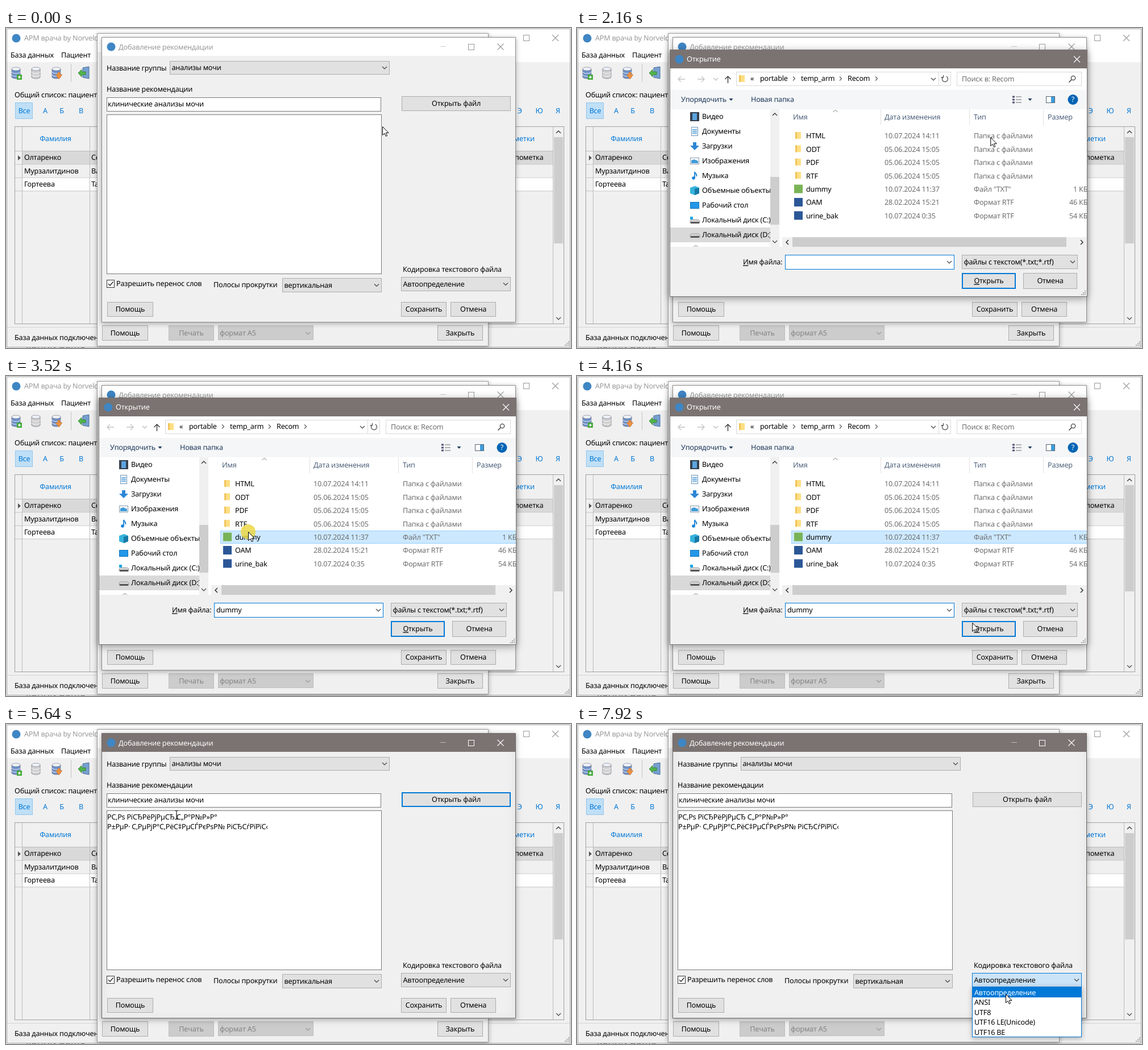
Recreate the animation shown at these times as an HTML page. Size 994 px wide and 563 px high, loop 8 s.

```html
<!DOCTYPE html>
<html lang="ru">
<head>
<meta charset="utf-8">
<title>Добавление рекомендации</title>
<style>
html, body { margin: 0; width: 100%; height: 100%; overflow: hidden; background: #f4f4f4; }
svg { display: block; width: 994px; height: 563px; }
text {
  font: 12.6px "Noto Sans", "Open Sans", sans-serif;
  letter-spacing: -.2px; text-rendering: geometricPrecision; fill: #000;
}
.mid { text-anchor: middle; }
.blue { fill: #0078d7; }
.white { fill: #fff; }
.dim { fill: #999; }
.off { fill: #838383; }
.meta { fill: #6d6d6d; }
.head { fill: #4c607a; }
.navy { fill: #1e395b; }
.ghost { font-size: 18px; fill: #777; }
.shadow { filter: drop-shadow(0 3px 7px rgba(0,0,0,.38)); }
.soft { filter: drop-shadow(0 2px 4px rgba(0,0,0,.3)); }

.step { opacity: 0; animation: 8s step-end infinite; }
#active { animation-name: active; }
#pickHover { animation-name: pickHover; }
#pickFocus { animation-name: pickFocus; }
#memo { animation-name: late; }
#okHover { animation-name: okHover; }
#caret { animation-name: caret; }
#rowHover { animation-name: rowHover; }
#rowOn { animation-name: rowOn; }
#rowGrey, #marked { animation-name: late; }
#typed { animation-name: typed; }
#coding { animation-name: coding; }
#list { animation-name: list; }
#ring { animation-name: ring; }
#beam { animation-name: beam; }
#arrow { animation: arrow 8s step-end infinite; }
#open { opacity: 0; transform-origin: 531px 255px; animation: open 8s linear infinite; }
#cursor { animation: move 8s ease-in-out infinite; }

@keyframes active { 0%, 23.5% { opacity: 0 } 1%, 55%, 100% { opacity: 1 } }
@keyframes pickHover { 0%, 23.5%, 100% { opacity: 0 } 15.2% { opacity: 1 } }
@keyframes pickFocus { 0%, 91%, 100% { opacity: 0 } 23.5% { opacity: 1 } }
@keyframes late { 0% { opacity: 0 } 55%, 100% { opacity: 1 } }
@keyframes okHover { 0%, 33%, 100% { opacity: 0 } 30%, 53% { opacity: 1 } }
@keyframes caret { 0%, 38.5%, 100% { opacity: 0 } 32% { opacity: 1 } }
@keyframes rowHover { 0%, 44%, 100% { opacity: 0 } 39.5% { opacity: 1 } }
@keyframes rowOn { 0%, 55%, 100% { opacity: 0 } 44% { opacity: 1 } }
@keyframes typed { 0% { opacity: 0 } 44%, 100% { opacity: 1 } }
@keyframes coding { 0% { opacity: 0 } 84.5%, 100% { opacity: 1 } }
@keyframes list { 0% { opacity: 0 } 91.5%, 100% { opacity: 1 } }
@keyframes ring { 0%, 23%, 45%, 56%, 92.5%, 100% { opacity: 0 } 21.5%, 44%, 54.5%, 91% { opacity: .8 } }
@keyframes beam { 0%, 78%, 100% { opacity: 0 } 63.5% { opacity: 1 } }
@keyframes arrow { 0%, 78%, 100% { opacity: 1 } 63.5% { opacity: 0 } }
@keyframes open {
  0%, 23.5% { opacity: 0; transform: scale(.92) }
  26%, 55% { opacity: 1; transform: none }
  56.5% { opacity: .42; transform: scale(.974) }
  59%, 100% { opacity: 0; transform: scale(.95) }
}
@keyframes move {
  0%, 1% { transform: translate(662px,173px) }
  3.5%, 9% { transform: translate(664px,181px) }
  19%, 25.5% { transform: translate(732px,133px) }
  30.5%, 32% { transform: translate(707px,443px) }
  42%, 45.2% { transform: translate(426px,274px) }
  53.5%, 61.5% { transform: translate(714px,445px) }
  69.5% { transform: translate(303px,153px) }
  70.5% { transform: translate(300px,160px) }
  71.5%, 72.5% { transform: translate(301px,172px) }
  79.5%, 84% { transform: translate(694px,440px) }
  86.5%, 97.5% { transform: translate(768px,454px) }
  99%, 100% { transform: translate(754px,475px) }
}
</style>
</head>
<body>
<svg id="stage" viewBox="0 0 994 563"></svg>
<script>
const rect = (x, y, w, h, fill, line, lw = 1) => line
  ? `<rect x="${x + lw / 2}" y="${y + lw / 2}" width="${w - lw}" height="${h - lw}" fill="${fill}" stroke="${line}" stroke-width="${lw}"/>`
  : `<rect x="${x}" y="${y}" width="${w}" height="${h}" fill="${fill}"/>`;
const text = (x, y, s, cls = '') => `<text x="${x}" y="${y + 4.4}" class="${cls}">${s}</text>`;
const path = (d, line = '#333', w = 1, fill = 'none') => `<path d="${d}" stroke="${line}" stroke-width="${w}" fill="${fill}"/>`;
const disc = (x, y, r, fill) => `<circle cx="${x}" cy="${y}" r="${r}" fill="${fill}"/>`;
const group = (id, body, cls = 'step') => `<g id="${id}" class="${cls}">${body}</g>`;
const clip = (id, x, y, w, h, body) =>
  `<clipPath id="${id}">${rect(x, y, w, h, '#000')}</clipPath><g clip-path="url(#${id})">${body}</g>`;

const down = (x, y, c = '#444') => path(`M${x - 4} ${y - 2}l4 4 4-4`, c, 1.2);
const up = (x, y) => path(`M${x - 4} ${y + 2}l4-4 4 4`, '#444', 1.5);
const right = (x, y, c = '#555') => path(`M${x - 2} ${y - 3.5}l3.5 3.5-3.5 3.5`, c, 1.1);
const tri = (x, y) => path(`M${x - 3.5} ${y - 2}h7l-3.5 4z`, 'none', 0, '#1e395b');
const cross = (x, y, c) => path(`M${x - 5.5} ${y - 5.5}l11 11m0-11l-11 11`, c, 1.1);
const box = (x, y, c) => rect(x - 5, y - 5, 11, 11, 'none', c);
const button = (x, y, w, h, s, line = '#adadad', fill = '#e1e1e1', lw = 1) =>
  rect(x, y, w, h, fill, line, lw) + text(x + w / 2, y + h / 2, s, 'mid');
const combo = (x, y, w, h, s, line = '#adadad', fill = '#e1e1e1') =>
  rect(x, y, w, h, fill, line) + text(x + 3.5, y + h / 2, s) + down(x + w - 9, y + h / 2);
const grip = (x, y) => [[0, 0], [-3, 0], [-6, 0], [0, -3], [-3, -3], [0, -6]]
  .map(([a, b]) => rect(x + a, y + b, 2, 2, '#a8a8a8')).join('');
const folder = (x, y) => rect(x - 5, y - 6, 10, 12, '#ffdf84') + rect(x - 5, y - 6, 3, 12, '#f1c45c');
const disk = (x, y) => path(`M${x - 8} ${y - 1}l3-2h11l3 2v4h-17z`, '#777', .6, '#d4d4d4') + rect(x - 7, y + 1, 15, 3, '#555');
const drum = (x, c, mark) =>
  path(`M${x - 9} 72v14c0 4 15 4 15 0v-14`, '#778', .8, c) +
  `<ellipse cx="${x - 1.5}" cy="72" rx="7.5" ry="3" fill="#eef3fa" stroke="#889" stroke-width=".8"/>` +
  path(`M${x - 9} 77c0 4 15 4 15 0m-15 5c0 4 15 4 15 0`, '#fff', .9) + mark;

function mainWindow() {
  const rows = [['Олтаренко', 'Се', '#d9d9d9'], ['Мурзалитдинов', 'Ва', '#f0f0f0'], ['Гортеева', 'Та', '#fff']];
  const grid = rows.map(([name, first, fill], i) => {
    const y = 217 + i * 23.4;
    return rect(29, y, 933, 23.4, fill) + path(`M16 ${y + 23}H962`, '#c4c4c4') +
      text(32, y + 11, name) + text(150, y + 11, first);
  }).join('');
  const letters = [['А', 69], ['Б', 98], ['В', 132], ['Э', 904], ['Ю', 938], ['Я', 971]];
  return text(35, 567, 'конци раше', 'ghost') +
    rect(1, 1, 992, 561, '#f0f0f0', '#a0a0a0') + rect(2, 2, 990, 58, '#fff') +
    disc(18, 18, 7.5, '#3f86c4') + text(32, 18, 'АРМ врача by Norvelda', 'dim') +
    box(915, 17, '#999') + cross(966.5, 17.5, '#999') +
    text(8, 48, 'База данных') + text(97, 48, 'Пациент') +
    drum(19, '#6b8fc7', rect(19, 82, 9, 9, '#45a83a') + path('M23.5 84v5m-2.5-2.5h5', '#fff', 1.5)) +
    drum(54, '#cfcfcf', '') +
    drum(90, '#6b8fc7', path('M87 82h4v-4h4v4h4l-6 8z', '#c56d20', .6, '#ee9142')) +
    path('M114.500 63v32', '#c4c4c4') +
    path('M135 70l11-2v21l-11-2z', '#4b6f9b', 1, '#76a0cf') + path('M127 79l6-6v4h7v5h-7v4z', '#277b2a', .8, '#52b54a') +
    text(15, 118, 'Общий список: пациенты') +
    rect(16, 131, 31, 29, '#bfdff6', '#93c5ea') + text(32, 146, 'Все', 'mid blue') +
    letters.map(([s, x]) => text(x, 146, s, 'mid blue')).join('') +
    rect(15, 173, 967, 348, '#f0f0f0', '#a0a0a0') + grid +
    path('M16 216.500H962M28.500 174V520M147.500 174V520M962.500 174V520', '#bcbcbc') +
    path('M21 224l5 4.500-5 4.500z', 'none', 0, '#555') +
    text(87, 195, 'Фамилия', 'mid blue') +
    `<text x="930" y="199.400" class="blue" text-anchor="end">Пометки</text>` +
    text(895, 228, 'пометка') +
    up(972, 183) + rect(964, 192, 16, 187, '#cdcdcd') + down(972, 511) +
    path('M2 526.500H992', '#d4d4d4') + text(15, 545, 'База данных подключена') + grip(989, 557);
}

function backWindow() {
  return `<g class="soft">${rect(160, 9, 689, 551, '#f0f0f0', '#9a9a9a')}</g>` + rect(161, 10, 687, 32, '#fff') +
    button(169, 523, 81, 27, 'Помощь') + rect(286, 523, 80, 27, '#ccc', '#bfbfbf') + text(326, 537, 'Печать', 'mid off') +
    rect(373, 523, 168, 26, '#ccc', '#bfbfbf') + text(376, 537, 'формат А5', 'off') + down(531, 537, '#999') +
    button(759, 523, 80, 27, 'Закрыть');
}

function caption(fill, cls, line) {
  return rect(169, 17, 727, 32, fill) + disc(185, 33, 7.5, '#3f86c4') +
    text(198, 34, 'Добавление рекомендации', cls) +
    path('M764 32.500h10', line, .5) + box(818, 33, line) + cross(870, 33, line);
}

function editor() {
  return `<g class="soft">${rect(168, 16, 729, 502, '#f0f0f0', '#8d8d8d')}</g>` + caption('#fff', 'dim', '#999') +
    group('active', `<g class="shadow">${rect(168, 16, 729, 502, 'none', '#6d6865')}</g>` + caption('#7a7371', 'white', '#fff')) +
    text(177, 71, 'Название группы') + combo(288, 58, 387, 24, 'анализы мочи') +
    text(177, 108, 'Название рекомендации') +
    rect(177, 122, 483, 25, '#fff', '#7a7a7a') + text(179, 134, 'клинические анализы мочи') +
    button(696, 120, 192, 26, 'Открыть файл') +
    group('pickHover', button(696, 120, 192, 26, 'Открыть файл', '#0078d7', '#e5f1fb')) +
    group('pickFocus', button(696, 120, 192, 26, 'Открыть файл', '#0078d7', '#e1e1e1', 2)) +
    rect(177, 152, 484, 281, '#fff', '#7a7a7a') +
    group('memo', text(178, 164, 'РС‚Рѕ РїСЂРёРјРµСЂ С„Р°Р№Р»Р°') +
      text(178, 181, 'Р±РµР· С‚РµРјР°С‚РёС‡РµСЃРєРѕР№ РіСЂСѓРїРїС‹')) +
    rect(177, 443, 14, 14, '#fff', '#333') + path('M180 450l3 3 5.500-6.500', '#222', 1.3) +
    text(194, 450, 'Разрешить перенос слов') + text(365, 452, 'Полосы прокрутки') +
    combo(486, 440, 175, 25, 'вертикальная') +
    text(698, 425, 'Кодировка текстового файла') + combo(695, 438, 193, 25, 'Автоопределение') +
    group('coding', combo(695, 438, 193, 25, 'Автоопределение', '#0078d7', '#cce4f7')) +
    button(178, 482, 81, 26, 'Помощь') + button(695, 482, 80, 26, 'Сохранить') + button(782, 482, 80, 26, 'Отмена');
}

function sideTree() {
  const icons = [
    y => rect(199, y - 8, 16, 16, '#36414d') + rect(203, y - 6, 8, 12, '#5ba4e0'),
    y => rect(201, y - 8, 12, 16, '#f5faff', '#6d96b8') + path(`M203 ${y - 3}h8m-8 3h8m-8 3h8`, '#4c9cd5', 1.3),
    y => path(`M204 ${y - 7}h6v6h5l-8 8-8-8h5z`, 'none', 0, '#2e87d6'),
    y => rect(199, y - 6, 16, 12, '#fff', '#8a9aa8') + path(`M201 ${y + 4}v-5l5-2 7 3v4z`, 'none', 0, '#3f9bd8'),
    y => path(`M207 ${y + 4}v-11c1 4 5 4 3 8`, '#1883d7', 1.8) + disc(205, y + 4, 2.8, '#1883d7'),
    y => path(`M199 ${y - 5}l9-3 7 3v10l-8 3-8-3z`, 'none', 0, '#36b3dc') + path(`M207 ${y - 3}l8-2v10l-8 3z`, 'none', 0, '#1679a6'),
    y => rect(199, y - 6, 16, 12, '#2397e8', '#1273bb'),
    y => disk(207, y + 2) + rect(199, y - 6, 5, 5, '#20a5e5'),
    y => disk(207, y + 1)
  ];
  const names = ['Видео', 'Документы', 'Загрузки', 'Изображения', 'Музыка', 'Объемные объекты',
    'Рабочий стол', 'Локальный диск (C:)', 'Локальный диск (D:)'];
  return rect(164, 351, 176, 26, '#d9d9d9') +
    names.map((s, i) => icons[i](156 + i * 26) + text(220, 156 + i * 26, s)).join('') +
    `<circle cx="209" cy="388" r="5" fill="#eee" stroke="#999"/>`;
}

function fileRows() {
  const files = [
    ['HTML', '10.07.2024 14:11'], ['ODT', '05.06.2024 15:05'], ['PDF', '05.06.2024 15:05'], ['RTF', '05.06.2024 15:05'],
    ['dummy', '10.07.2024 11:37', 'Файл "TXT"', '1 КБ', '#79b356'],
    ['OAM', '28.02.2024 15:21', 'Формат RTF', '46 КБ', '#2b5797'],
    ['urine_bak', '10.07.2024 0:35', 'Формат RTF', '54 КБ', '#2b5797']
  ];
  return files.map(([name, date, type = 'Папка с файлами', size = '', mark], i) => {
    const y = 190 + i * 23.4;
    return (mark ? rect(382, y - 8, 15, 15, mark) : folder(389, y - 1)) +
      text(403, y, name) + text(541, y, date, 'meta') + text(698, y, type, 'meta') +
      text(size.length > 4 ? 866 : 873, y, size, 'meta');
  }).join('');
}

function openDialog() {
  return `<g class="shadow">${rect(163, 38, 735, 435, '#f0f0f0', '#77716f')}</g>` +
    rect(163, 38, 735, 33, '#7a7371') + disc(180, 55, 7.5, '#3f86c4') + text(193, 55, 'Открытие', 'white') + cross(879.5, 55, '#fff') +
    rect(164, 71, 733, 314, '#fff') + rect(164, 109, 733, 34, '#f5f6f7') +
    path('M190 90h-12m5-5l-5 5 5 5M212 90h12m-5-5l5 5-5 5', '#c3c3c3', 1.3) + down(244, 90, '#bbb') +
    path('M265.500 97v-12m-5 5l5-5 5 5', '#444', 1.5) +
    rect(280, 77, 378, 25, '#fff', '#d9d9d9') + path('M636.500 78v23', '#d9d9d9') + folder(290, 89) +
    text(305, 89, '«') + text(322, 89, 'portable') + text(394, 89, 'temp_arm') + text(476, 89, 'Recom') +
    right(382, 89) + right(464, 89) + right(527, 89) + down(627, 90) +
    path('M643.500 86.500a5 5 0 1 0 6-1.500m-5-2v4h-4', '#555', 1.3) +
    rect(668, 77, 220, 25, '#fff', '#d9d9d9') + text(677, 90, 'Поиск в: Recom', 'meta') +
    `<circle cx="873" cy="88" r="3.700" fill="none" stroke="#444" stroke-width="1.300"/>` + path('M870 91l-4.500 4.500', '#444', 1.6) +
    text(183, 126, 'Упорядочить', 'navy') + tri(271, 126) + text(306, 126, 'Новая папка', 'navy') + tri(797, 126) +
    path('M766 121h4m-4 5h4m-4 5h4', '#557', 3) + path('M772 121h10m-10 5h10m-10 5h10', '#999', 1.5) +
    rect(825, 120, 16, 12, '#fff', '#567') + rect(834, 121, 6, 10, '#3e9bd9') +
    disc(872.5, 126, 9, '#0064b5') + text(872.5, 126, '?', 'mid white') +
    clip('treeClip', 164, 143, 176, 242, sideTree()) +
    rect(340, 143, 16, 242, '#f0f0f0') + rect(340, 262, 16, 84, '#cdcdcd') + up(348, 152) + down(348, 376) +
    text(380, 157, 'Имя', 'head') + text(541, 157, 'Дата изменения', 'head') + text(698, 157, 'Тип', 'head') + text(828, 157, 'Размер', 'head') +
    path('M534.500 143v28M690.500 143v28M820.500 143v28', '#e2e2e2') + path('M450.500 148l4-4 4 4', '#777') +
    clip('fileClip', 357, 143, 540, 225,
      group('rowHover', rect(377, 272, 540, 23, '#e5f3ff')) +
      group('rowOn', rect(377, 272, 540, 23, '#cce8ff', '#99d1ff')) +
      group('rowGrey', rect(377, 272, 540, 23, '#d9d9d9')) + fileRows()) +
    rect(361, 368, 536, 17, '#f0f0f0') + rect(379, 368, 482, 17, '#cdcdcd') +
    path('M372 373l-4 4 4 4M886 373l4 4-4 4', '#333', 1.5) +
    text(292, 412, '<tspan text-decoration="underline">И</tspan>мя файла:') +
    rect(366, 399, 298, 26, '#fff', '#0078d7') + down(655, 412) +
    group('caret', rect(370, 403, 1, 17, '#000')) +
    group('typed', text(370, 412, 'dummy')) +
    group('marked', rect(370, 403, 43, 17, '#0078d7') + text(370, 412, 'dummy', 'white')) +
    combo(677, 399, 204, 25, 'файлы с текстом(*.txt;*.rtf)') +
    button(677, 431, 95, 28, OK, '#0078d7', '#e1e1e1', 2) +
    group('okHover', button(677, 431, 95, 28, OK, '#0078d7', '#e5f1fb')) +
    button(785, 431, 95, 28, 'Отмена') + grip(893, 468);
}
const OK = '<tspan text-decoration="underline">О</tspan>ткрыть';

function codingList() {
  return `<g class="soft">${rect(695, 462, 193, 89, '#fff', '#0078d7')}</g>` + rect(696, 463, 191, 18, '#0078d7') +
    ['Автоопределение', 'ANSI', 'UTF8', 'UTF16 LE(Unicode)', 'UTF16 BE']
      .map((s, i) => text(699, 472.5 + i * 17.4, s, i ? '' : 'white')).join('');
}

const cursor =
  group('ring', disc(0, 0, 13, '#ecd63a')) +
  group('arrow', path('M.5 .5V15.500L4 12.300 6.300 17.500 8.600 16.500 6.300 11.400H11Z', '#000', 1, '#fff'), '') +
  group('beam', path('M-3 -7.500h2.500l.5 .5 .5-.5h2.500M0 -7v14M-3 7.500h2.500l.5-.5 .5 .5h2.500', '#000', 1.1));

document.getElementById('stage').innerHTML = mainWindow() + backWindow() + editor() +
  group('open', openDialog(), '') + group('list', codingList()) + group('cursor', cursor, '');
</script>
</body>
</html>
```
